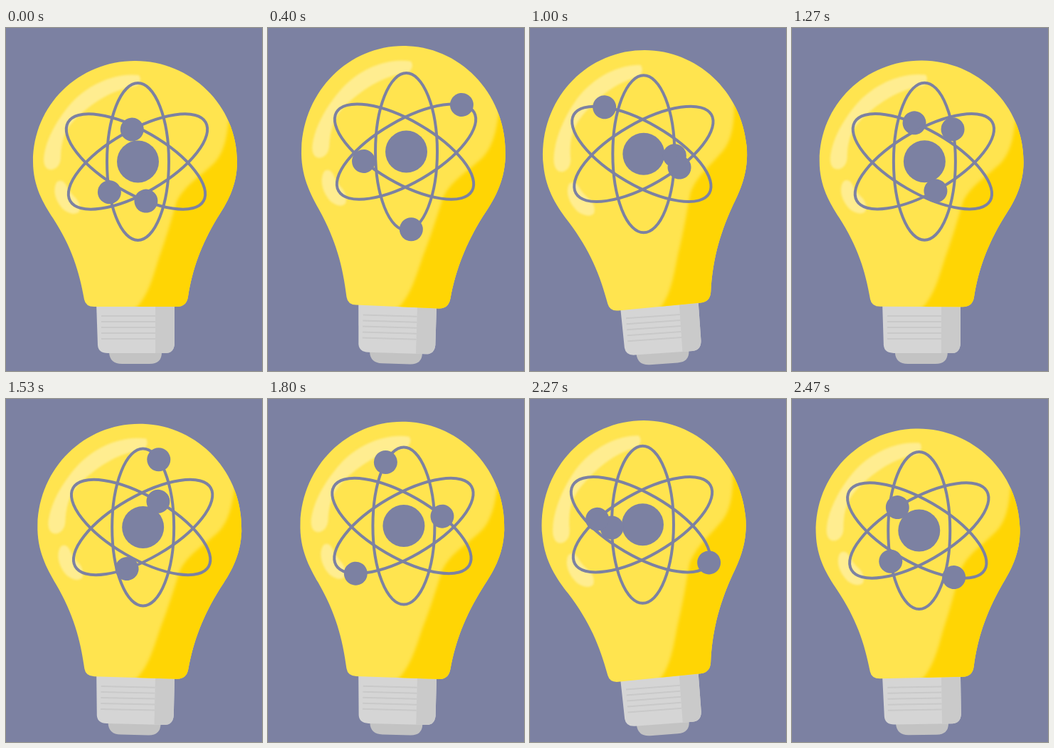
These frames come from a looping animation (360x480 px, 2.54 s). An HTML page with a canvas:

```html
<!DOCTYPE html>
<html lang="en">
<head>
<meta charset="utf-8">
<title>Atom in a light bulb</title>
<style>
  html, body { margin: 0; width: 100%; height: 100%; overflow: hidden; background: #7c81a2; }
  canvas { display: block; }
</style>
</head>
<body>
<canvas id="stage" width="360" height="480"></canvas>
<script>
const ctx = document.getElementById('stage').getContext('2d');
const LOOP = 2540, STEPS = 38, SWAY = 1250, TAU = Math.PI * 2, DEG = TAU / 360;
const NECK = { x: 182, y: 390 }, BACK = '#7c81a2';

// One sway: time, lean of the glass, rise of the top, x of the atom
const POSES = [
  [0, 0, 0, 185.5], [280, 6, -11, 192.5], [400, 8.5, -21, 194.5], [480, 11, -23, 196],
  [670, -0.5, -1, 181.5], [820, -7.5, -5, 173], [1000, -19, -16, 160], [1115, -24, -18, 156],
  [1220, -5, -5, 178]
];

// Angles in degrees, speed in degrees per second, pull speeds up one end of the orbit
const ORBITS = [
  { tilt: 90, start: -58, speed: -145.7, pull: 4, x: 0 },
  { tilt: 30, start: 63.6, speed: 136, pull: -14, x: -3 },
  { tilt: -30, start: -79.5, speed: 138.5, pull: 12, x: 0 }
];
const LONG = 110, SHORT = 43.5;

const glass = new Path2D(`M181.5 46C260 46 325 108 325 187C325 222 310 246 297 266
  C274 304 262 338 256 376Q254 390 240 390H124Q112 390 110 380
  C103 340 92 306 66 266C53 246 38 222 38 187C38 108 102 46 181.5 46Z`);
const shade = new Path2D(`M313 130C310 160 304 182 285 196C271 209 250 222 240 243
  C232 270 226 292 215 322C206 350 200 376 180 395H350V130Z`);
const shine = new Path2D(`M187 66C152 62 114 80 91 106C70 130 54 160 53 185Q54 200 66 198
  Q77 194 77 180C78 155 84 140 100 125C124 103 150 86 184 81Q192 73 187 66Z
  M72 215C65 224 68 242 82 255Q96 264 103 257Q106 248 99 239Q89 230 84 219Q79 211 72 215Z`);
const socket = new Path2D('M127 384H237V442Q236 455 224 455H143Q130 455 129 444Z');
const socketShade = new Path2D('M210 384H237V442Q236 455 224 455H210Z');
const socketTip = new Path2D('M145 454H219Q219 470 202 470H163Q146 470 145 454Z');

// Smooth curve through the poses
function pose(time) {
  const count = POSES.length;
  const key = i => {
    const turn = Math.floor(i / count);
    const [at, ...values] = POSES[i - turn * count];
    return [at + turn * SWAY, ...values];
  };
  let i = count - 1;
  while (POSES[i][0] > time) i--;
  const [p, a, b, n] = [key(i - 1), key(i), key(i + 1), key(i + 2)];
  const span = b[0] - a[0], u = (time - a[0]) / span;
  return [1, 2, 3].map(c => {
    const from = (b[c] - p[c]) / (b[0] - p[0]) * span;
    const to = (n[c] - a[c]) / (n[0] - a[0]) * span;
    const d = b[c] - a[c];
    return a[c] + u * (from + u * (3 * d - 2 * from - to + u * (from + to - 2 * d)));
  });
}

function fill(path, color, blur = 0) {
  ctx.filter = blur ? `blur(${blur}px)` : 'none';
  ctx.fillStyle = color;
  ctx.fill(path);
  ctx.filter = 'none';
}

function disc(x, y, r) {
  ctx.beginPath();
  ctx.arc(x, y, r, 0, TAU);
  ctx.fill();
}

// Turn and stretch around the neck
function lean(angle, stretch) {
  ctx.translate(NECK.x, NECK.y);
  ctx.rotate(angle);
  ctx.scale(1, stretch);
  ctx.translate(-NECK.x, -NECK.y);
}

function drawSocket(angle) {
  ctx.save();
  lean(angle, 1);
  fill(socketTip, '#c3c3c3');
  fill(socket, '#d5d5d5');
  fill(socketShade, '#cacaca');
  ctx.fillStyle = '#c9c9c9';
  for (let y = 402; y < 442; y += 8) ctx.fillRect(134, y, 76, 2);
  ctx.restore();
}

function drawGlass(angle, stretch) {
  ctx.save();
  lean(angle, stretch);
  fill(glass, '#ffe44f');
  ctx.clip(glass);
  fill(shade, '#ffd504', 2);
  fill(shine, '#ffed90', 1.5);
  ctx.restore();
}

// Even pace along the ellipse: solve for the angle by repeated substitution
function orbitAngle({ start, speed, pull }, time) {
  const mean = (start + Math.abs(speed) * time / 1000) * DEG;
  let angle = mean;
  for (let i = 0; i < 30; i++) {
    angle = mean + 15 * DEG * Math.sin(2 * angle) + pull * DEG * Math.cos(angle);
  }
  return angle;
}

function drawAtom(x, y, time) {
  ctx.save();
  ctx.translate(x, y);
  ctx.fillStyle = ctx.strokeStyle = BACK;
  ctx.lineWidth = 4;
  disc(0, 0, 29.5);
  for (const orbit of ORBITS) {
    ctx.save();
    ctx.translate(orbit.x, 0);
    ctx.rotate(orbit.tilt * DEG);
    ctx.beginPath();
    ctx.ellipse(0, 0, LONG, SHORT, 0, 0, TAU);
    ctx.stroke();
    const angle = orbitAngle(orbit, time);
    disc(LONG * Math.cos(angle), Math.sign(orbit.speed) * SHORT * Math.sin(angle), 16.5);
    ctx.restore();
  }
  ctx.restore();
}

const begin = performance.now();
function draw() {
  const elapsed = (performance.now() - begin) % LOOP;
  const step = Math.floor(elapsed * STEPS / LOOP + 0.1) % STEPS;
  const time = step * LOOP / STEPS;
  const [dx, dy, atomX] = pose(time % SWAY);
  const angle = Math.atan(dx / 205);
  ctx.fillStyle = BACK;
  ctx.fillRect(0, 0, 360, 480);
  drawSocket(angle * 0.75);
  drawGlass(angle, 1 - dy / 344);
  drawAtom(atomX, 187 + dy * 0.66, time);
  requestAnimationFrame(draw);
}
draw();
</script>
</body>
</html>
```
